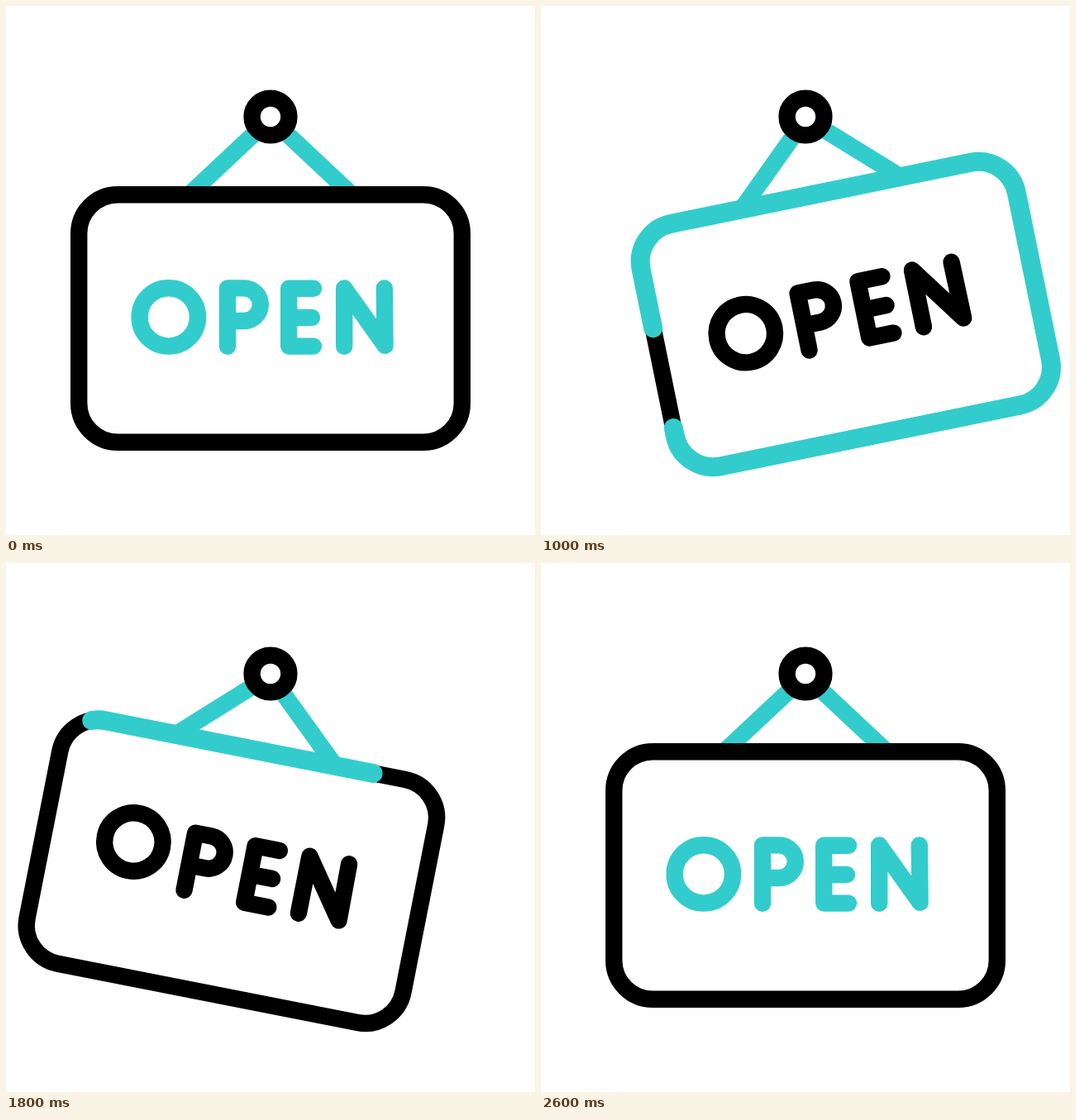
Animation of 640 by 640 pixels, one loop 3000 ms. Source, as an HTML page with a canvas:

```html
<!DOCTYPE html>
<html lang="en">
<head>
<meta charset="utf-8">
<title>Swinging open sign</title>
<style>
html, body { margin: 0; width: 100%; height: 100%; overflow: hidden; background: #fff; }
canvas { display: block; }
</style>
</head>
<body>
<canvas width="640" height="640"></canvas>
<script>
const ctx = document.querySelector('canvas').getContext('2d');
const LOOP = 3000, TEAL = '#33cccc', BLACK = '#000', LINE = 20.4;
const PIVOT = { x: 320, y: 134 };
const BOARD = { x: 88.2, y: 228.2, w: 463.6, h: 299.6, r: 47 };
const PERIMETER = 2 * (BOARD.w + BOARD.h) - 8 * BOARD.r + 2 * Math.PI * BOARD.r;

const frame = new Path2D();
frame.roundRect(BOARD.x, BOARD.y, BOARD.w, BOARD.h, BOARD.r);
const ring = new Path2D();
ring.arc(PIVOT.x, PIVOT.y, 22.4, 0, 2 * Math.PI);
const strings = new Path2D('M304 151L224 226M336 151L416 226');
const letters = [
  'M161.6 376.4a35.2 35.2 0 1 1 70.4 0a35.2 35.2 0 1 1 -70.4 0z',
  'M268 411.8V341.4H288a19.8 19.8 0 0 1 0 39.6H268',
  'M372 341.8H342.2V411.6H372M342.2 377H370',
  'M409.2 411.8V341.5L458.6 410.8L457.8 341.5'
].map(d => new Path2D(d));

// Cubic ease with flat ends; x1 and x2 set how long it lingers at each end.
function ease(t, from, to, x1 = 1 / 3, x2 = 2 / 3) {
  const u = (t - from) / (to - from);
  if (u <= 0) return 0;
  if (u >= 1) return 1;
  let lo = 0, hi = 1;
  for (let i = 0; i < 24; i++) {
    const s = (lo + hi) / 2, r = 1 - s;
    if (3 * s * r * r * x1 + 3 * s * s * r * x2 + s * s * s < u) lo = s;
    else hi = s;
  }
  return lo * lo * (3 - 2 * lo);
}

function stroke(path, color, width = LINE) {
  ctx.strokeStyle = color;
  ctx.lineWidth = width;
  ctx.stroke(path);
}

function swing(t) {
  return -12.05 * ease(t, 140, 880, 0.63, 0.295)
    + 23.2 * ease(t, 880, 1760, 0.6, 0.2)
    - 11.15 * ease(t, 1760, 2600, 0.7, 0.03);
}

function drawWord(t) {
  const first = t < 1500;
  const [start, duration, travel] = first ? [260, 520, 296] : [1742, 540, 322];
  const [leaving, entering] = first ? [TEAL, BLACK] : [BLACK, TEAL];
  ctx.save();
  ctx.clip(frame);
  letters.forEach((letter, i) => {
    const begin = start + 43 * i;
    const p = ease(t, begin, begin + duration);
    for (const [color, y] of [[leaving, -travel * p], [entering, travel * (1 - p)]]) {
      ctx.save();
      ctx.translate(0, y);
      stroke(letter, color);
      ctx.restore();
    }
  });
  ctx.restore();
}

// A teal stretch grows, then shrinks, while it travels round the frame.
function drawRunner(t) {
  const tail = PERIMETER * ease(t, 1112, 2423, 0.5, 0.238);
  const length = PERIMETER * ease(t, 160, 1240, 0.57, 0.5) - tail;
  if (length <= 0) return;
  const d = t - 1300;
  const offset = 1484 + 0.605 * d - 4.6e-5 * d * d;
  ctx.setLineDash([length, PERIMETER - length]);
  ctx.lineDashOffset = -(offset + tail) % PERIMETER;
  stroke(frame, TEAL, 23);
  ctx.setLineDash([]);
}

function draw(now) {
  const t = now % LOOP;
  ctx.clearRect(0, 0, 640, 640);
  ctx.save();
  ctx.translate(PIVOT.x, PIVOT.y);
  ctx.rotate(swing(t) * Math.PI / 180);
  ctx.translate(-PIVOT.x, -PIVOT.y);
  ctx.lineCap = 'butt';
  stroke(strings, TEAL);
  ctx.lineCap = ctx.lineJoin = 'round';
  drawWord(t);
  stroke(frame, BLACK);
  drawRunner(t);
  ctx.restore();
  stroke(ring, BLACK);
}

const origin = performance.now();
function tick() {
  draw(performance.now() - origin);
  requestAnimationFrame(tick);
}
tick();
</script>
</body>
</html>
```
